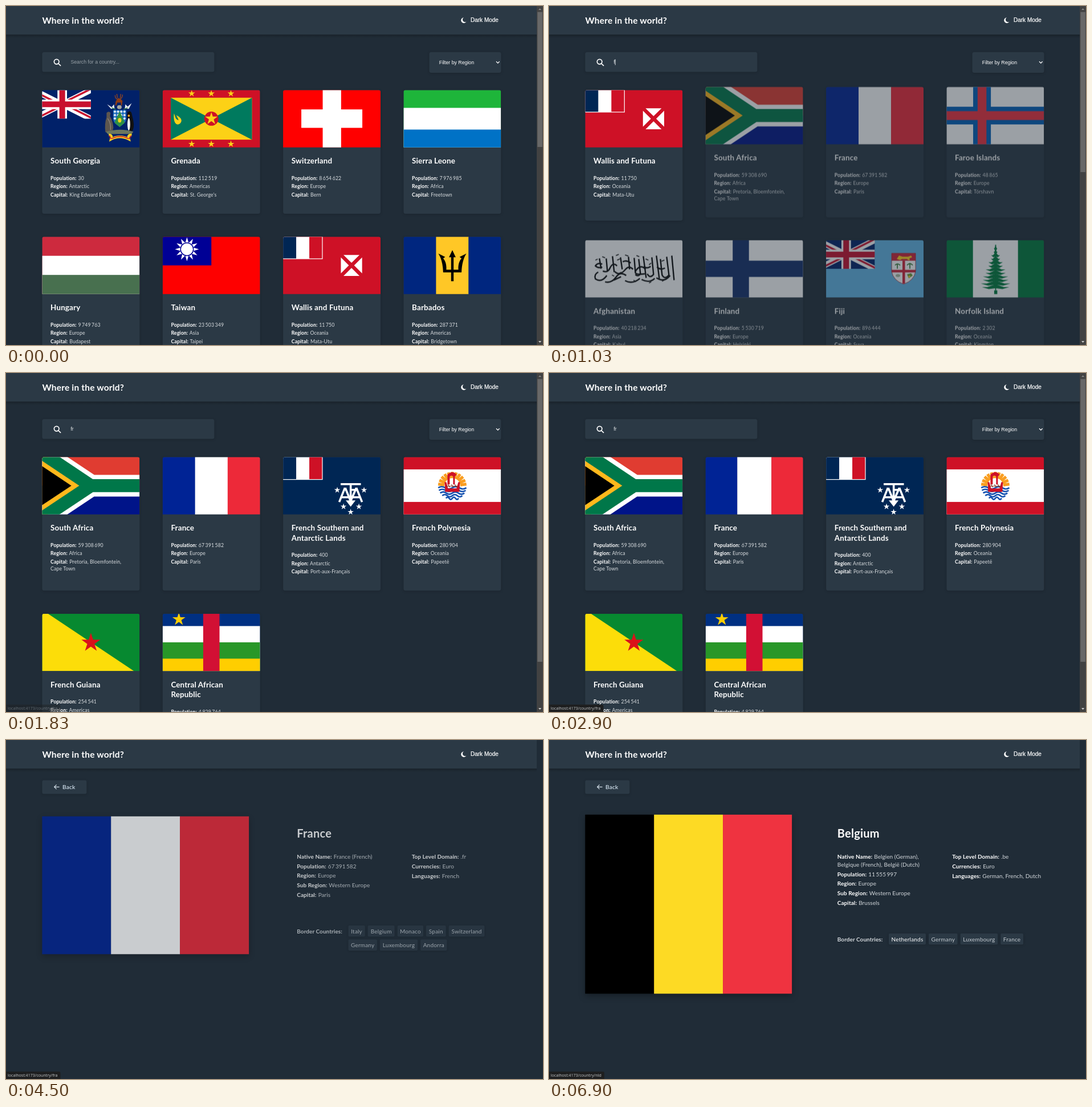
An HTML page for the animation above (8000 ms loop, 942 by 594 pixels).

```html
<!DOCTYPE html>
<html lang="en">
<head>
<meta charset="utf-8">
<title>Where in the world?</title>
<style>
html, body { margin: 0; width: 100%; height: 100%; overflow: hidden; background: #202c37; }
svg { display: block; }
#stage { width: 942px; height: 594px; }
text { font-family: Lato, "Open Sans", sans-serif; letter-spacing: .012em; fill: #fff; }
.arial { font-family: "Liberation Sans", Arial, sans-serif; letter-spacing: 0; font-size: 8.75px; }
.tip { font: 7.1px "Open Sans", sans-serif; letter-spacing: 0; fill: #c4c8ca; }
.b { font-weight: 700; fill: #fff; }
.name { font-size: 13.4px; font-weight: 700; }
.row { font-size: 8.75px; fill: #d9dde0; }
.big { font-size: 20px; font-weight: 700; }
.fact { font-size: 10px; letter-spacing: .006em; fill: #d3d8dc; }
.tag { font-size: 10px; letter-spacing: .02em; fill: #c3cad0; text-anchor: middle; }
.panel { fill: #2b3945; filter: drop-shadow(0 1px 2px rgba(0,0,0,.18)); }
.pic { filter: drop-shadow(0 4px 6px rgba(0,0,0,.3)); }
</style>
</head>
<body>
<svg id="stage" viewBox="0 0 942 594">
  <defs>
    <clipPath id="top"><path d="M0 100.5V3.5a3.5 3.5 0 0 1 3.5-3.5h164a3.5 3.5 0 0 1 3.5 3.5v97z"/></clipPath>
    <linearGradient id="fall" x2="0" y2="1"><stop stop-color="#000" stop-opacity=".22"/><stop offset="1" stop-opacity="0"/></linearGradient>
  </defs>
  <rect width="942" height="594" fill="#202c37"/>
  <g id="home">
    <rect class="panel" x="63.4" y="80.7" width="302" height="34.8" rx="3.5"/>
    <g fill="none" stroke="#fff" stroke-width="1.7" stroke-linecap="round">
      <circle cx="88.7" cy="97.6" r="4.3"/><path d="M92 101l3.6 3.4"/>
    </g>
    <text id="query" class="arial" x="113.4" y="101.4"></text>
    <rect id="caret" y="93.5" width="1" height="10" fill="#dfe3e6"/>
    <rect class="panel" x="742.5" y="80.7" width="126" height="36.3" rx="3.5"/>
    <text class="arial" x="759.8" y="101.8">Filter by Region</text>
    <path d="M860 97.3l2.8 2.8 2.8-2.8" fill="none" stroke="#fff" stroke-width="1.3"/>
  </g>
  <g id="scenes"></g>
  <g id="back">
    <rect class="panel" x="63.4" y="70.4" width="78" height="24" rx="3"/>
    <path d="M93.6 82.3h-8.8m3.8-3.9l-3.9 3.9 3.9 3.9" fill="none" stroke="#d3dfe8" stroke-width="1.2"/>
    <text x="99" y="85.8" font-size="10.2" font-weight="600" style="fill:#cfdeea">Back</text>
  </g>
  <rect y="50" width="931" height="6" fill="url(#fall)"/>
  <rect width="931" height="50" fill="#2b3945"/>
  <text x="63.4" y="30.6" font-size="15.5" font-weight="700">Where in the world?</text>
  <path d="M803 20.2a4.9 4.9 0 1 0 4.4 7.4a4.2 4.2 0 0 1-4.4-7.4z" fill="#fff"/>
  <text class="arial" x="815" y="28.4" style="font-size:10px;stroke:#fff;stroke-width:.22px">Dark Mode</text>
  <g id="bar">
    <rect x="931" width="11" height="594" fill="#424242"/>
    <rect id="thumb" x="932.3" y="10.5" width="8.6" fill="#686868"/>
    <path d="M934 7l2.6-3 2.6 3z" fill="#858585"/>
    <path d="M934 587l2.6 3 2.6-3z" fill="#d0d0d0"/>
  </g>
  <g id="tip">
    <path id="tipBox" fill="#1e1f20"/>
    <text id="tipText" class="tip" x="3" y="590.2"></text>
  </g>
</svg>
<script>
const $ = id => document.getElementById(id);
const rect = (x, y, w, h, f) => `<rect x="${x}" y="${y}" width="${w}" height="${h}" fill="${f}"/>`;
const path = (d, f) => `<path d="${d}" fill="${f}"/>`;
const line = (d, c, w) => `<path d="${d}" fill="none" stroke="${c}" stroke-width="${w}"/>`;
const disc = (x, y, r, f) => `<circle cx="${x}" cy="${y}" r="${r}" fill="${f}"/>`;
const oval = (x, y, a, b, f) => `<ellipse cx="${x}" cy="${y}" rx="${a}" ry="${b}" fill="${f}"/>`;
const all = (n, fn) => Array.from({ length: n }, (_, i) => fn(i)).join('');
const full = f => rect(0, 0, 171, 101, f);
const across = (a, b, c, y1, y2) => full(a) + rect(0, y1, 171, 101 - y1, b) + rect(0, y2, 171, 101 - y2, c);
const upright = (cols, w, h) => cols.map((c, i) => rect(i * w / 3, 0, w / 3 + .2, h, c)).join('');

function star(x, y, r, f, n = 5, k = .382) {
  const pts = Array.from({ length: 2 * n }, (_, i) => {
    const a = i * Math.PI / n, q = i % 2 ? r * k : r;
    return (x + q * Math.sin(a)).toFixed(2) + ',' + (y - q * Math.cos(a)).toFixed(2);
  });
  return `<polygon points="${pts.join(' ')}" fill="${f}"/>`;
}

// 2:1 canton, its left edge cropped by the card
const jack = '<svg x="-15" width="100.5" height="50.25" viewBox="0 0 60 30">' + rect(0, 0, 60, 30, '#012169') +
  line('M0 0L60 30M60 0L0 30', '#fff', 6) +
  line('M-.45 .9L29.55 15.9M60.45 29.1L30.45 14.1M59.55-.9L29.55 14.1M.45 30.9L30.45 15.9', '#c8102e', 2) +
  line('M30 0V30M0 15H60', '#fff', 10) + line('M30 0V30M0 15H60', '#c8102e', 6) + '</svg>';

const canton = h => rect(0, 0, 69.5, h, '#fff') + rect(0, 0, 23, h - 1.2, '#002654') + rect(46, 0, 22.3, h - 1.2, '#ce1126');

const arms =
  line('M128 9q0 6 4 7M141 8q0 6-5 8M131 7l1 7M138 7l-1 7', '#a24a1c', 1.2) +
  path('M129 20l4-6 4 1 4 4-1 8h-2v-5h-6l-2 5h-2z', '#8d3d16') +
  path('M114 25l8 5 4-5 1 7-6 1zM157 23l-7 6-4-4-1 7 7 1z', '#e9ecef') +
  line('M122 31l7 3M150 31l-7 3', '#3f8a4a', 1.4) + oval(135.5, 30, 4, 3.4, '#aaa79c') +
  path('M124.5 35h23v14c0 8-6 12-11.5 15-6-3-11.5-7-11.5-15z', '#1f6fbf') +
  all(12, i => star(127.6 + i % 4 * 5.6, 38 + (i / 4 | 0) * 6, 2.6, '#e9eef2', 4, .6)) +
  path('M136 37l9 20-9 8-9-8z', '#2f8f45') + oval(136, 53, 3, 4, '#ffd21f') +
  path('M113 40q4-4 7 0l-1 6q5 8 6 20l-2 8h-12q-2-15 2-26z', '#5d564e') + line('M115 50q6 8 5 20', '#8d847a', 1.3) +
  path('M150 39q5-4 7 2l3 13q2 12-2 18h-6q-4-18-2-33z', '#111') + oval(152, 60, 2.4, 11, '#f4f4f0') + oval(152, 45, 1.8, 2, '#f3a51f') +
  path('M112 73q25-7 48 0l-3 4h-42z', '#6b765e') +
  line('M117 79q6-1 4 7q15-8 31 0q-2-8 5-7', '#ffd21f', 4.6) + line('M122 85q15-7 29 0M118 80l3 6M156 80l-4 6', '#c8202e', 1.8);

const shield = path('M115 23h42v32q-3 16-21 22-18-6-21-22z', '#fff') + rect(115, 23, 42, 13, '#cf2338') +
  path('M124 33l4-6 6 2h10l5-2 2 3-5 2 1 3h-3l-2-2h-9l-3 2z', '#ffd21f') +
  rect(134, 36, 4.5, 40, '#cf2338') + rect(115, 52, 42, 4.5, '#cf2338') +
  line('M125 41v9M147 40v10M121 44q4-5 9 0M142 44q5-6 10 0', '#3a7d3a', 1.7) +
  oval(126, 62, 4, 2.6, '#a9b9a0') + path('M142 60l7-2 3 4-7 5z', '#6d9a34') + disc(146, 64, 1.8, '#ffd21f') +
  `<path d="M115 23h42v32q-3 16-21 22-18-6-21-22z" fill="none" stroke="#9c2430" stroke-width=".8"/>`;

const script = line('M152 27l4 43M143 29l4 32q-7 9-12 0l-3-28M125 27l5 40M117 30l3 30q-6 8-11-1M102 28l5 38M94 33l3 26q-4 6-9 1M86 31l2 24M76 29l2 22M62 30l3 21M48 28l3 28M37 32l2 22M25 32l3 18', '#0a0a0a', 2.4) +
  line('M149 62q-10 13-24 4M122 67q-9 9-23 2M106 51q-8-9-16 1t15 7M96 67q-13 11-26 4M84 51q-7-7-13 0t-8 6q-6 4-11-2M72 62q-10-8-18 3t-19 8M56 45q-7-7-12 3q-4 10-13 6M38 62q-9 13-20 6q-3-8 5-12M30 42q-8-3-12 3q5 5 12 2M50 70l13-6M80 40q-8-6-14-2M140 49q-8 4-14-2M115 46q-7 5-12 0', '#0a0a0a', 2.4) +
  line('M106 33l5 2M90 27l5 2M70 26l6 2M56 35l5-2M30 29l5 2M112 43l4-3M134 37l5-2M85 70l4 3M47 61l4 2M54 27l5-2M135 72l5-3M112 75l4-2M18 35l4-2', '#111', 1.5);

const pine = rect(85.2, 8, 1.8, 80, '#007a3d') + rect(83.5, 88, 5.5, 6.5, '#007a3d') + all(12, i => {
  const y = 14 + i * 6.2, w = Math.min(3 + 2.4 * i, 26) - i % 2 * 2;
  return path(`M86 ${y - 5}L${86 + w * .6} ${y}L${86 + w} ${y}L${86 + w * .5} ${y + 3.6}L86 ${y + 2}L${86 - w * .5} ${y + 3.6}L${86 - w} ${y}L${86 - w * .6} ${y}Z`, '#007a3d');
});

const boat = all(11, i => {
  const a = Math.PI * (1 + (i + .5) / 11), c = Math.cos(a), s = Math.sin(a);
  return line(`M${85.5 + 14 * c} ${51 + 14 * s}L${85.5 + 25 * c} ${51 + 25 * s}`, '#f99d1f', 5.2);
}) + all(5, i => {
  const y = 54 + i * 4.6, w = Math.sqrt(Math.max(0, 625 - (y - 50) ** 2));
  return line(`M${85.5 - w} ${y}q${w / 4}-4 ${w / 2} 0t${w / 2} 0t${w / 2} 0t${w / 2} 0`, '#1552b0', 2.6);
}) + path('M72 44h3l3 11h15l3-11h3l-1 17H73z', '#ce1126') +
  path('M77 48V31q9-9 16 0l-3 3v14h-3V34q-3-3-6 0v14z', '#ce1126') +
  line('M75 51h21M78 48l3 5M84 48l3 5M90 48l3 5', '#7c2d1a', 1.1);

const tine = 'M61 29.5C66 37 69 48 69.5 62.5H84.5V57.8H75C75.6 50 74 43 69.5 38L73 35.5z';
const france = ['#002395', '#fff', '#ed2939'], belgium = ['#000', '#fdda24', '#ef3340'];
const crosses = (v, h, c, w) => line(`M${v} 0V101M0 ${h}H171`, c, w);

const flags = {
  gs: full('#012169') + jack + arms,
  gd: full('#ce1126') + rect(14.3, 13.5, 142.4, 73.5, '#fcd116') +
    path('M14.3 13.5L85.5 50.2L14.3 87zM156.7 13.5L85.5 50.2L156.7 87z', '#007a5e') +
    disc(85.5, 50.2, 12.4, '#ce1126') + star(85.5, 50.2, 11.5, '#fcd116') +
    all(6, i => star(51 + i % 3 * 34.4, i < 3 ? 6.2 : 94.6, 6.2, '#fcd116')) +
    path('M20 41c3 7 2 10 8 12c-1-4-3-6-4-9c6 3 9 6 9 10c-1 5-5 7-8 6c-5-2-6-11-5-19z', '#fcd116'),
  ch: full('#f00') + rect(69.5, 0, 32.3, 101, '#fff') + rect(32, 34, 107, 32.3, '#fff'),
  sl: across('#1eb53a', '#fff', '#0072c6', 31.3, 69.3),
  hu: across('#cd2a3e', '#fff', '#48704f', 33.5, 67),
  tw: full('#fe0000') + rect(0, 0, 85.5, 50.3, '#000095') + star(42.7, 22, 21, '#fff', 12, .55) +
    disc(42.7, 22, 12, '#000095') + disc(42.7, 22, 10.5, '#fff'),
  wf: full('#ce1126') + canton(39.3) +
    path('M106 32h28L120 45.7zM106 68.8h28L120 54.9zM101.4 36.4v28L115.4 50.3zM138.6 36.4v28L124.6 50.3z', '#fff'),
  bb: upright(['#00267f', '#ffc726', '#00267f'], 171, 101) + path('M85.6 23.5L91.5 36H87.8V78H83.4V36H79.7z', '#000') +
    path(tine, '#000') + `<g transform="translate(171.2 0) scale(-1 1)">${path(tine, '#000')}</g>`,
  za: '<g transform="translate(0 -6.8) scale(1.9)">' + rect(0, 0, 90, 30, '#e03c31') + rect(0, 30, 90, 30, '#001489') +
    line('M0 0L45 30H90M0 60L45 30', '#fff', 20) + path('M0 0L45 30L0 60z', '#ffb81c') +
    path('M0 12L27 30L0 48z', '#000') + line('M0 0L45 30H90M0 60L45 30', '#007749', 12) + '</g>',
  fr: upright(france, 171, 101),
  fo: full('#fff') + crosses(62.2, 50.25, '#005eb9', 31.1) + crosses(62.2, 50.25, '#ef303e', 15.5),
  af: full('#fff') + script,
  fi: full('#fff') + crosses(61.75, 50.25, '#15306c', 28.5),
  fj: full('#62b5e5') + jack + shield,
  nf: full('#007a3d') + rect(46.3, 0, 79, 101, '#fff') + pine,
  tf: full('#002654') + canton(40) +
    line('M101 47.5H136.5M118.6 47V82M108.5 54L98.5 79M109 54L118 76M128.5 54L119 76M128.5 54L138.5 79M103 70.5H135M119 57.5H131', '#fff', 3.6) +
    path('M110 76h17l-8.4 11z', '#fff') +
    [[95, 58], [142, 58], [106, 87], [133, 87], [118.5, 96.5]].map(p => star(...p, 5.6, '#fff')).join(''),
  pf: across('#ce1126', '#fff', '#ce1126', 21.7, 78.7) + boat,
  gf: full('#078930') + path('M0 0H10.2L161 100.5H0z', '#fcdd09') + star(85.5, 51, 17.5, '#da121a'),
  cf: across('#003082', '#fff', '#289728', 21.7, 50.2) + rect(0, 78.8, 171, 22, '#ffce00') +
    rect(71.2, 0, 28.6, 101, '#d21034') + star(28.5, 10, 12, '#ffce00')
};

const countries = {
  gs: ['South Georgia', '30', 'Antarctic', 'King Edward Point'],
  gd: ['Grenada', '112 519', 'Americas', "St. George's"],
  ch: ['Switzerland', '8 654 622', 'Europe', 'Bern'],
  sl: ['Sierra Leone', '7 976 985', 'Africa', 'Freetown'],
  hu: ['Hungary', '9 749 763', 'Europe', 'Budapest'],
  tw: ['Taiwan', '23 503 349', 'Asia', 'Taipei'],
  wf: ['Wallis and Futuna', '11 750', 'Oceania', 'Mata-Utu'],
  bb: ['Barbados', '287 371', 'Americas', 'Bridgetown'],
  za: ['South Africa', '59 308 690', 'Africa', 'Pretoria, Bloemfontein,|Cape Town'],
  fr: ['France', '67 391 582', 'Europe', 'Paris'],
  fo: ['Faroe Islands', '48 865', 'Europe', 'Tórshavn'],
  af: ['Afghanistan', '40 218 234', 'Asia', 'Kabul'],
  fi: ['Finland', '5 530 719', 'Europe', 'Helsinki'],
  fj: ['Fiji', '896 444', 'Oceania', 'Suva'],
  nf: ['Norfolk Island', '2 302', 'Oceania', 'Kingston'],
  tf: ['French Southern and|Antarctic Lands', '400', 'Antarctic', 'Port-aux-Français'],
  pf: ['French Polynesia', '280 904', 'Oceania', 'Papeetē'],
  gf: ['French Guiana', '254 541', 'Americas', 'Cayenne'],
  cf: ['Central African|Republic', '4 829 764', 'Africa', 'Bangui']
};

const digits = n => n.split(' ').map((s, i) => i ? `<tspan dx="1.4">${s}</tspan>` : s).join('');
const fact = (cls, x, y, label, value, gap) => {
  const [first, next] = value.split('|');
  return `<text class="${cls}" x="${x}" y="${y}"><tspan class="b">${label}:</tspan> <tspan dx=".5">${label === 'Population' ? digits(first) : first}</tspan></text>` +
    (next ? `<text class="${cls}" x="${x}" y="${y + gap}">${next}</text>` : '');
};

function card(key, i, pitch, h) {
  const [name, pop, region, capital] = countries[key], lines = name.split('|');
  const y = 157.4 + (lines.length - 1) * 17.7;
  return `<g transform="translate(${63.4 + i % 4 * 211.33} ${147.2 + (i / 4 | 0) * pitch})">` +
    `<rect class="panel" width="171" height="${h}" rx="3.5"/>` +
    `<g clip-path="url(#top)"><g class="flag-${key}">${flags[key]}</g></g>` +
    lines.map((s, j) => `<text class="name" x="14.7" y="${128.9 + j * 17.7}">${s}</text>`).join('') +
    fact('row', 14.7, y, 'Population', pop) + fact('row', 14.7, y + 14.5, 'Region', region) +
    fact('row', 14.7, y + 29, 'Capital', capital, 12) + '</g>';
}
const grid = (keys, pitch, h, from = 0) => keys.split(' ').map((k, i) => card(k, i + from, pitch, h)).join('');

// tags: [name, x, width, row]
function detail(name, cols, h, native, pop, capital, langs, tld, tags) {
  const s = native.includes('|') ? 14 : 0;
  const left = [['Population', pop], ['Region', 'Europe'], ['Sub Region', 'Western Europe'], ['Capital', capital]];
  const right = [['Top Level Domain', tld], ['Currencies', 'Euro'], ['Languages', langs]];
  return `<g class="rise"><g class="pic" transform="translate(63.4 130.8)">${upright(cols, 362.5, h)}</g></g><g class="slide">` +
    `<text class="big" x="505.8" y="171">${name}</text>` + fact('fact', 505.8, 207.6, 'Native Name', native, 14) +
    left.map((f, i) => fact('fact', 505.8, 224.5 + s + i * 16.85, ...f)).join('') +
    right.map((f, i) => fact('fact', 707.2, 207.6 + i * 16.95, ...f)).join('') +
    `<text class="fact b" x="505.8" y="${338.5 + s}">Border Countries:</text>` +
    tags.map(([n, x, w, r]) => `<rect class="panel" x="${x}" y="${325 + s + r * 24.4}" width="${w}" height="19.6" rx="2"/>` +
      `<text class="tag" data-name="${n}" x="${x + w / 2}" y="${338.5 + s + r * 24.4}">${n}</text>`).join('') + '</g>';
}

const scenes = [
  grid('gs gd ch sl hu tw wf bb', 257, 216.7),
  grid('wf', 268.6, 228.8) + `<g class="fly">${grid('za fr fo af fi fj nf', 268.6, 228.8, 1)}</g>`,
  `<g class="fly">${grid('za fr tf pf gf cf', 274.5, 234)}</g>`,
  detail('France', france, 241.5, 'France (French)', '67 391 582', 'Paris', 'French', '.fr', [
    ['Italy', 596, 29.3, 0], ['Belgium', 630.2, 47, 0], ['Monaco', 682.2, 45.4, 0], ['Spain', 732.4, 34.8, 0], ['Switzerland', 772.2, 62.8, 0],
    ['Germany', 596, 50.4, 1], ['Luxembourg', 651.3, 66.4, 1], ['Andorra', 722.6, 46.4, 1]]),
  detail('Belgium', belgium, 313.7, 'Belgien (German),|Belgique (French), België (Dutch)', '11 555 997', 'Brussels', 'German, French, Dutch', '.be', [
    ['Netherlands', 596, 65, 0], ['Germany', 666, 50.6, 0], ['Luxembourg', 721.6, 65.6, 0], ['France', 792.2, 39.8, 0]])
];
$('scenes').innerHTML = scenes.map(s => `<g>${s}</g>`).join('');
const groups = [...$('scenes').children];

const clamp = v => Math.max(0, Math.min(1, v));
const within = (t, a, b) => t >= a && t < b;

// cubic-bezier(.25, .1, .25, 1)
function ease(v) {
  const x = clamp(v);
  let lo = 0, hi = 1;
  for (let i = 0; i < 24; i++) {
    const u = (lo + hi) / 2;
    if (.75 * u * (1 - u) + u ** 3 < x) lo = u; else hi = u;
  }
  return x === 1 ? 1 : .3 * lo * (1 - lo) ** 2 + 3 * lo * lo * (1 - lo) + lo ** 3;
}

function fade(el, p, dx, dy) {
  el.setAttribute('opacity', p);
  el.setAttribute('transform', `translate(${dx * (1 - p)} ${dy * (1 - p)})`);
}
const show = (el, on) => { el.style.display = on ? '' : 'none'; };
const hover = (scene, name, on) => {
  groups[scene].querySelector(`[data-name=${name}]`).style.fill = on ? '#fff' : '';
};

function draw(t) {
  const n = [900, 1300, 4300, 6430].filter(s => t >= s).length;
  const home = n < 3, g = groups[n];
  groups.forEach((el, i) => show(el, i === n));
  show($('home'), home);
  show($('bar'), home);
  show($('back'), !home);

  if (home) {
    $('query').textContent = ['Search for a country...', 'f', 'fr'][n];
    $('query').style.fill = n ? '#e3e6e8' : '#98a1a8';
    $('caret').setAttribute('x', [113.6, 115.7, 118.9][n]);
    show($('caret'), within(t, 500, 1830) || within(t, 2360, 2900) || within(t, 3430, 3960));
    $('thumb').setAttribute('height', [236.5, 280.5, 495.5][n]);
    if (n) fade(g.querySelector('.fly'), ease((t - 870) / 500), 0, -12.5);
    if (n === 2) {
      const z = 1 + .05 * (ease((t - 1800) / 500) - ease((t - 3070) / 500) + ease((t - 3600) / 500));
      g.querySelector('.flag-fr').setAttribute('transform', `translate(85.5 50.2) scale(${z}) translate(-85.5 -50.2)`);
    }
  } else {
    const p = ease((t - (n === 3 ? 4270 : 6400)) / 500);
    fade(g.querySelector('.rise'), p, 0, 12.5);
    fade(g.querySelector('.slide'), p, 18.75, 0);
    hover(3, 'Belgium', t >= 5960);
    hover(4, 'Netherlands', t >= 6560);
  }

  const code = t < 5000 ? 'fra' : t < 6560 ? 'bel' : 'nld', w = code === 'nld' ? 97 : 95.5;
  $('tipText').textContent = 'localhost:4173/country/' + code;
  $('tipBox').setAttribute('d', `M0 594V581H${w - 2.5}q2.5 0 2.5 2.5V594z`);
  $('tip').setAttribute('opacity', t < 5000
    ? clamp((t - 1790) / 100) * clamp((4830 - t) / 200)
    : clamp((t - 6130) / 100));
}

function tick() {
  draw(performance.now() % 8000);
  requestAnimationFrame(tick);
}
tick();
</script>
</body>
</html>
```
